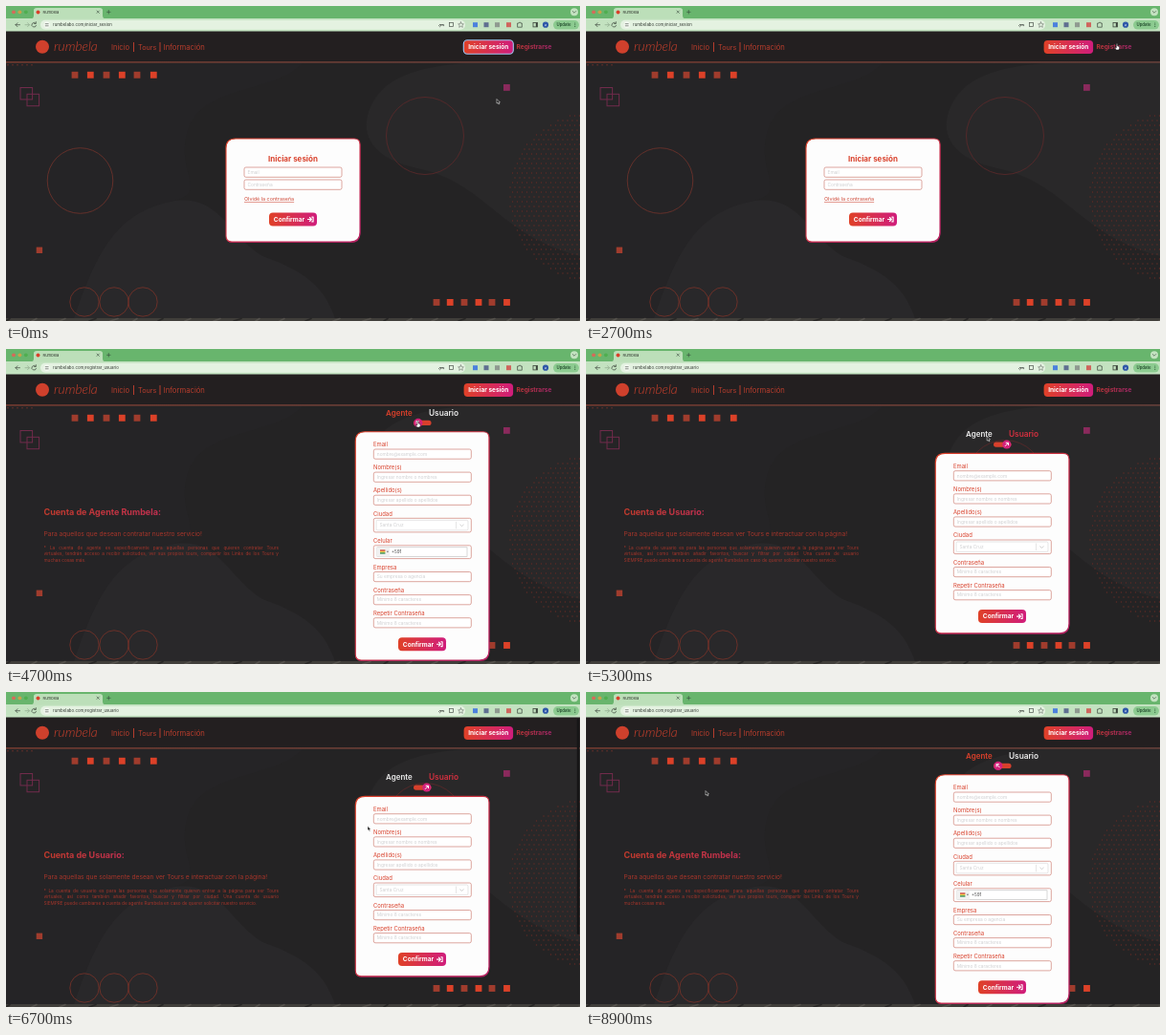
These frames come from a looping animation (600 by 330 pixels, 9 s). An HTML page:

```html
<!DOCTYPE html>
<html lang="es">
<head>
<meta charset="utf-8">
<title>Rumbela</title>
<style>
html, body { margin: 0; width: 100%; height: 100%; overflow: hidden; background: #242324; }
svg { position: absolute; left: 0; top: 0; font-family: Inter, "Open Sans", sans-serif; }
.body { font: 4.7px/6.5px Inter, sans-serif; color: #a5352a; white-space: nowrap; }
.body div { text-align-last: justify; }
.body div:last-child { text-align-last: left; }
</style>
</head>
<body>
<svg id="stage" width="600" height="330" viewBox="0 0 600 330"></svg>
<script>
const RED = '#d9402b', MAUVE = '#8a2a5c';
const stage = document.getElementById('stage');

// Markup helpers
const rect = (x, y, w, h, fill, more = '') =>
  `<rect x="${x}" y="${y}" width="${w}" height="${h}" fill="${fill}" ${more}/>`;
const disc = (x, y, r, fill, more = '') =>
  `<circle cx="${x}" cy="${y}" r="${r}" fill="${fill}" ${more}/>`;
const ring = (x, y, r, color, w = 1) => disc(x, y, r, 'none', `stroke="${color}" stroke-width="${w}"`);
const line = (d, color, w = .7) =>
  `<path d="${d}" fill="none" stroke="${color}" stroke-width="${w}" stroke-linecap="round" stroke-linejoin="round"/>`;
const shape = (d, fill, more = '') => `<path d="${d}" fill="${fill}" ${more}/>`;
const text = (x, y, size, fill, str, more = '') =>
  `<text x="${x}" y="${y}" font-size="${size}" fill="${fill}" ${more}>${str}</text>`;
const group = (id, content) => `<g id="${id}">${content}</g>`;
const bold = 'font-weight="700"', semi = 'font-weight="600"', mid = 'text-anchor="middle"';

function button(x, y, label, icon) {
  const cx = x + (icon ? 21 : 25.7), w = icon ? 50 : 51.5;
  let s = rect(x, y, w, 14, 'url(#hot)', 'rx="4"') + text(cx, y + 9.3, 6.5, '#fff', label, `${bold} ${mid}`);
  if (icon) s += line(`M${x + 40.5} ${y + 7}h3.6m-1.7 -2l2 2l-2 2m2.4 -4.4h1.3v4.8h-1.3`, '#fff', 1.1);
  return s;
}
// Two opposite corners are rounder than the others
function card(x, y, w, h) {
  const d = `h${w - 16}q6 0 6 6v${h - 16}q0 10 -10 10h${16 - w}q-6 0 -6 -6v${16 - h}q0 -10 10 -10Z`;
  return shape(`M${x + 10.5} ${y + 1}${d}`, '#a01d5c') +
    shape(`M${x + 10} ${y}${d}`, '#fdfdfd', 'stroke="url(#edge)" stroke-width="1.1"');
}
const input = (x, y, h, hint) =>
  rect(x, y, 102, h, '#fff', 'rx="1.8" stroke="#cf8076" stroke-width=".7"') +
  text(x + 3.5, y + h / 2 + 1.7, 4.8, '#cfcfd1', hint);

function backdrop() {
  let s = rect(0, 26, 600, 304, '#242324') +
    shape('M0 60H310C280 92 205 82 190 130C176 176 215 195 172 205C120 216 96 250 70 330H0Z', '#252426') +
    shape('M70 330C96 250 120 216 172 205C222 195 232 240 268 262C320 280 335 300 345 330Z', '#29282a') +
    shape('M600 60H480C430 64 394 74 380 108C366 144 398 164 430 170C500 184 515 240 600 262Z', '#292829');
  for (let x = 2; x < 32; x += 5) s += disc(x, 61.7, .7, '#7c352a');
  for (let row = 0; row < 37; row++)
    for (let col = 0; col < 17; col++) {
      const x = 522 + col * 5 + row % 2 * 2.5, y = 110 + row * 5;
      if (Math.hypot(x - 615, y - 200) < 90) s += disc(x, y, .75, '#602b26');
    }
  const squares = (xs, y) => xs.forEach((x, i) => s += rect(x - 3.4, y, 6.8, 6.9, i % 2 ? '#dc4128' : '#a03c2d'));
  squares([72, 88.3, 105, 121.3, 137, 154.3], 68.8);
  squares([450, 464.2, 479, 494, 508, 523.5], 307);
  [[15, 85.5], [22, 92.3]].forEach(([x, y]) =>
    s += rect(x, y, 12.6, 12.4, 'none', 'stroke="#712b4b"'));
  s += rect(520, 82, 6.8, 6.8, MAUVE) + rect(31.7, 252.6, 6.4, 6.4, '#a03c2d');
  s += ring(438, 136, 40.5, '#59292a', .9);
  [82, 113, 143].forEach(x => s += ring(x, 310, 15.2, '#7c3329', .8));
  s += rect(0, 327, 600, 3, '#403e3a');
  for (let i = 0; i < 24; i++)
    s += line(`M${i * 26 + i * i % 11} 330l${4 + i % 5} -2.5`, i % 3 ? '#55524d' : '#282726', 1.6);
  return s;
}

function browser() {
  let s = rect(0, 0, 600, 14, '#68b56d') + rect(0, 13, 600, 13.5, '#c3e2c0') +
    shape('M26 13.5Q29 13 29 10V4.5Q29 2 32 2H98Q101 2 101 4.5V10Q101 13 104 13.5Z', '#bcdfb9');
  ['#d8695a', '#c9a24b', '#4fae4f'].forEach((c, i) => s += disc(8 + i * 6.4, 6.3, 1.9, c));
  s += disc(33.5, 6.5, 2, RED) + text(38.5, 8, 4.1, '#30362f', 'Rumbela');
  s += disc(594, 6.3, 4, '#c3e2c0');
  s += line('M95 5l2.4 2.4m0 -2.4l-2.4 2.4M105.5 6.3h3.6m-1.8 -1.8v3.6M592.3 5.5l1.7 1.7l1.7 -1.7', '#34453a', .6);
  s += line('M14.5 19.7H10m2 -2l-2 2l2 2', '#3c463c') + line('M20 19.7H24.5m-2 -2l2 2l-2 2', '#8fa98d');
  s += line('M31 18.2a2.3 2.3 0 1 0 .5 2.2M31.3 16.6v1.8h-1.8', '#3c463c');
  s += rect(36, 14.7, 444, 10, '#e4f2e1', 'rx="5"') + disc(42.7, 19.7, 3.2, '#f5faf3');
  s += line('M41.2 18.7h3M41.2 20.8h3', '#3c463c', .6);
  s += text(49, 21.3, 4.4, '#333a33', '<tspan id="url"></tspan>');
  s += line('M453.5 19.5a1 1 0 1 0 .1 0h4v1.2m-1.4 -1.2v1', '#4e554e', .7);
  s += rect(463.5, 17.5, 4, 4, 'none', 'stroke="#4e554e" stroke-width=".7"');
  s += line('M475.5 16.8l.9 1.9l2 .2l-1.5 1.4l.4 2l-1.8 -1l-1.8 1l.4 -2l-1.5 -1.4l2 -.2Z', '#4e554e', .5);
  [[488, '#4b80dd'], [499.5, '#5f6f90'], [511, '#8f9a90'], [523, '#cf655d']].forEach(([x, c]) =>
    s += rect(x, 17.2, 5, 5, c));
  s += line('M535 18h1.2a.9 .9 0 0 1 1.8 0h1.3v4.2h-4.3Z', '#3c463c');
  s += rect(551, 17.5, 4.4, 4.4, 'none', 'stroke="#3c463c" stroke-width=".8"') + rect(553.8, 17.5, 1.6, 4.4, '#3c463c');
  s += disc(564, 19.7, 3.1, '#2f58a8') + text(564, 21, 3.5, '#fff', 'a', mid);
  s += rect(572, 15, 27, 9.6, '#8ccb90', 'rx="4.8"') + text(575.5, 21.3, 4.3, '#1f4a2b', 'Update', semi);
  [18, 19.7, 21.4].forEach(y => s += disc(594.8, y, .5, '#1f4a2b'));
  return s;
}

function navbar() {
  const c = '#b53c2c';
  return rect(0, 26.5, 600, 32, '#231f20') + rect(0, 58.3, 600, 1.2, 'url(#rule)') +
    disc(38, 42.7, 7, '#cf402c') +
    text(50, 47, 13.8, '#cf402c', 'rumbela', 'font-family="Lato, sans-serif" font-style="italic" font-weight="300"') +
    text(110, 45.6, 7.6, c, 'Inicio') + text(138, 45.6, 7.3, c, 'Tours') + text(164.6, 45.6, 7.7, c, 'Información') +
    rect(133, 38, 1, 10, c) + rect(160.5, 38, 1, 10, c) +
    button(478.6, 36, 'Iniciar sesión') +
    rect(478.3, 35.7, 52, 14.6, 'none', 'id="focus" rx="4" stroke="#a9c6f5" stroke-width="1.1"') +
    text(533.5, 45.4, 6.6, 'url(#link)', 'Registrarse', bold);
}

const login = () => ring(77.5, 183, 34.3, '#64302a') + card(230, 139, 140, 108) +
  text(300, 163, 8, RED, 'Iniciar sesión', `${bold} ${mid}`) +
  input(249, 169, 10.3, 'Email') + input(249, 182, 10.3, 'Contraseña') +
  text(249, 204.2, 5.4, '#cf4a38', 'Olvidé la contraseña', 'text-decoration="underline"') +
  button(275, 216.5, 'Confirmar', true);

function popup() {
  let s = rect(280, 182.6, 79, 71.4, '#000', 'rx="2" opacity=".25"') + rect(280, 182, 79, 71, '#f4f6f0', 'rx="2"');
  ['julio.tovar@example.com', 'mlunavera@example.com.bo', 'vdlmercado@example.com'].forEach((mail, i) => {
    const y = 191 + i * 18.2;
    s += disc(286, y + 2.5, 2.3, '#dd5a48') + text(292.6, y, 4.3, '#25282a', mail) +
      text(292.6, y + 7, 4.2, '#44484a', '••••••••');
  });
  return s + rect(280, 239.5, 79, .6, '#d5d9d0') + disc(286, 246.5, 2.1, '#3f4443') +
    text(292.6, 248.2, 4.3, '#25282a', 'Manage Passwords...') +
    ring(350.5, 246.5, 1.1, '#3f4443', .7) + line('M351.6 246.5h3v1', '#3f4443');
}

// Registration form; rows are [label, hint, height]
function form(top, height, rows, agent) {
  const head = top - 17.2;
  let s = text(397, head, 8, agent ? RED : '#ececec', 'Agente', semi) +
    text(442, head, 8.3, agent ? '#ececec' : '#d3303f', 'Usuario', semi) +
    rect(426, head + 5.2, 18.5, 5.4, '#d8402c', 'rx="2.7"') + card(365.3, top, 139.6, height);
  let y = top + 18.3;
  rows.forEach(([label, hint, h]) => {
    s += text(384, y - 2.8, 5.9, RED, label) + input(384.3, y, h, hint);
    if (label == 'Ciudad') s += rect(387, y + 2, 96, h - 4, 'none', 'rx="1.5" stroke="#d4d4d6" stroke-width=".6"') +
      rect(470, y + 3.5, .5, h - 7, '#ccc') + line(`M474.8 ${y + 6.8}l1.7 1.6l1.7 -1.6`, '#bbb');
    if (label == 'Celular') s += rect(388, y + 2, 94, h - 4, '#fff', 'stroke="#bbb" stroke-width=".6"') +
      rect(388, y + 2, 13, h - 4, '#f1f1f1') + rect(391, y + 4.6, 5.4, 1.4, '#cf3a2c') +
      rect(391, y + 6, 5.4, 1.4, '#ead24c') + rect(391, y + 7.4, 5.4, 1.4, '#3b8b4a') +
      shape(`M397.7 ${y + 6}h2.4l-1.2 1.5Z`, '#666') + text(403, y + 8.4, 4.6, '#444', '+591');
    y += h + 13.9;
  });
  return s + button(410, y - 3.6, 'Confirmar', true);
}

const about = (title, sub, lines) =>
  text(39.5, 173.7, 9, 'url(#title)', title, bold) + text(39.5, 196, 6.65, '#a5352a', sub) +
  `<foreignObject x="39.5" y="204.8" width="245.5" height="24"><div class="body" xmlns="http://www.w3.org/1999/xhtml">` +
  lines.map(l => `<div>${l}</div>`).join('') + '</div></foreignObject>';

const person = [['Email', 'nombre@example.com', 10.2], ['Nombre(s)', 'Ingresar nombre o nombres', 10.2],
  ['Apellido(s)', 'Ingresar apellido o apellidos', 10.2], ['Ciudad', '&#160;&#160;Santa Cruz', 14.6]];
const secret = [['Contraseña', 'Mínimo 8 caracteres', 10.2], ['Repetir Contraseña', 'Mínimo 8 caracteres', 10.2]];
const work = [['Celular', '', 13.8], ['Empresa', 'Su empresa o agencia', 10.2]];

const agent = () => about('Cuenta de Agente Rumbela:', 'Para aquellos que desean contratar nuestro servicio!', [
  '* La cuenta de agente es específicamente para aquellas personas que quieren contratar Tours',
  'virtuales, tendrán acceso a recibir solicitudes, ver sus propios tours, compartir los Links de los Tours y',
  'muchas cosas más.']) + form(86.7, 239.3, [...person, ...work, ...secret], true);
const user = () => about('Cuenta de Usuario:', 'Para aquellas que solamente desean ver Tours e interactuar con la página!', [
  '* La cuenta de usuario es para las personas que solamente quieren entrar a la página para ver Tours',
  'virtuales, así como también añadir favoritos, buscar y filtrar por ciudad. Una cuenta de usuario',
  'SIEMPRE puede cambiarse a cuenta de agente Rumbela en caso de querer solicitar nuestro servicio.'
]) + form(109.4, 188.4, [...person, ...secret], false);

const grad = (id, a, b, more = '') =>
  `<linearGradient id="${id}" ${more}><stop stop-color="${a}"/><stop offset="1" stop-color="${b}"/></linearGradient>`;

stage.innerHTML = `<defs>${
  grad('hot', '#df4127', '#d01d7c') + grad('link', '#bd3434', '#a5266a') + grad('title', '#c23a2c', '#c22f50') +
  grad('edge', '#e0452c', '#b82262', 'x2="1" y2="1"') +
  grad('rule', '#8c4234', '#7b4a42', 'gradientUnits="userSpaceOnUse" x2="600"')}</defs>` +
  backdrop() + navbar() + group('login', login()) + group('popup', popup()) +
  group('agent', agent()) + group('user', user()) +
  group('knob', disc(0, 0, 4.6, '#d3227a') + group('tip', line('M-1.5 1.5L1.5 -1.5M-.7 -1.7H1.7V.7', '#fff', 1))) +
  rect(596.8, 28, 2.4, 226, '#161516', 'id="scroll" rx="1.2"') +
  browser() +
  group('arrow', '<path d="M0 0V4.6L1.1 3.7L1.9 5.4L2.8 5L2 3.4H3.4Z" fill="#111" stroke="#fff" stroke-width=".5"/>') +
  group('hand', '<path d="M-.6 -2.2Q0 -2.9 .6 -2.2V0L2.6 .6V2.4L1.8 4H-.8L-2.3 1.6L-.6 1.8Z" fill="#fff" stroke="#111" stroke-width=".5"/>') +
  group('beam', line('M-1 -2.6Q0 -2.6 0 -1.8V1.8Q0 2.6 -1 2.6M1 -2.6Q0 -2.6 0 -1.8M0 1.8Q0 2.6 1 2.6', '#222', .7));

const part = {};
stage.querySelectorAll('[id]').forEach(e => part[e.id] = e);
const show = (id, on) => part[id].style.display = on ? '' : 'none';
const place = (id, x, y) => part[id].setAttribute('transform', `translate(${x} ${y})`);
const ease = u => { u = Math.min(1, Math.max(0, u)); return u * u * (3 - 2 * u); };

// Pointer path: time, x, y
const path = [[0, 513, 97.5], [100, 513, 97.5], [700, 275, 183], [1600, 275, 183], [2500, 555, 42], [3000, 555, 42],
  [4200, 430.5, 78], [5000, 430.5, 78], [6000, 378, 140.5], [6900, 378, 140.5], [7400, 440, 100],
  [7600, 440, 100], [8500, 125, 103.5], [9000, 125, 103.5]];

function draw(t) {
  const joined = t >= 3000, asUser = t >= 5000 && t < 7500;
  show('login', !joined);
  show('focus', t < 800);
  show('popup', t >= 800 && t < 1700);
  show('agent', joined && !asUser);
  show('user', asUser);
  show('scroll', t >= 6500 && t < 7300);
  part.url.textContent = 'rumbelabo.com/' + (joined ? 'registrar_usuario' : 'iniciar_sesion');

  const slide = ease((t - 4900) / 300) - ease((t - 7400) / 300);
  show('knob', joined);
  place('knob', 430.8 + 9 * slide, asUser ? 100 : 77.4);
  part.tip.setAttribute('transform', `rotate(${-90 + 90 * slide})`);

  const i = path.findIndex(p => p[0] > t), [t0, x0, y0] = path[i - 1], [t1, x1, y1] = path[i];
  const u = ease((t - t0) / (t1 - t0)), x = x0 + (x1 - x0) * u, y = y0 + (y1 - y0) * u;
  const beam = t >= 700 && t <= 1600;
  const hand = t >= 2500 && t <= 3000 || t >= 4200 && t <= 5000 || t >= 7400 && t <= 7600;
  for (const [id, on] of [['beam', beam], ['hand', hand], ['arrow', !beam && !hand]]) {
    show(id, on);
    place(id, x, y);
  }
}

const start = performance.now();
function tick() {
  const t = (performance.now() - start) % 9000;
  draw(Math.floor(t / 100) * 100);
  requestAnimationFrame(tick);
}
tick();
</script>
</body>
</html>
```
